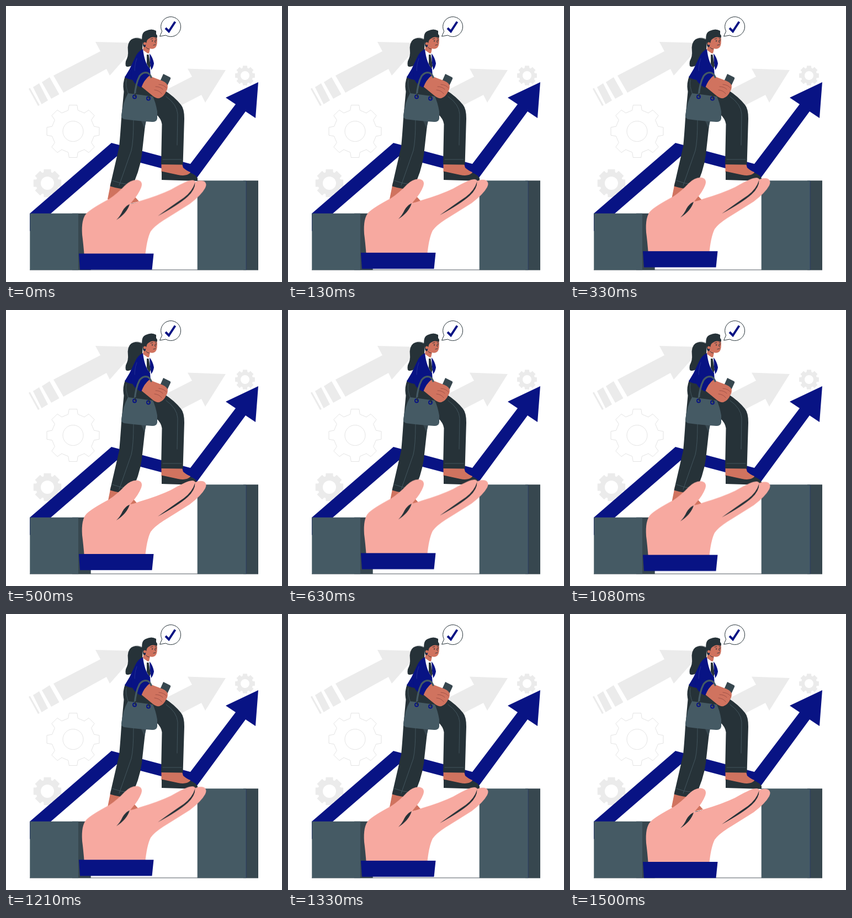
Recreate the animation shown at these times as an HTML page. Size 500 by 500 pixels, loop 1540 ms.

```html
<!DOCTYPE html>
<html lang="en">
<head>
<meta charset="utf-8">
<title>Step up</title>
<style>
  html, body { margin: 0; width: 100%; height: 100%; overflow: hidden; background: #fff; }
  svg { display: block; width: 100%; height: 100%; }
  .pale { fill: #ebebeb; }
  .navy { fill: #081384; }
  .ink { fill: #263238; }
  .slate { fill: #455a64; }
  .deep { fill: #37474f; }
  .skin { fill: #d0735f; }
  .palm { fill: #f7a9a0; }
  .line { fill: none; stroke-linecap: round; stroke-linejoin: round; }
</style>
</head>
<body>
<svg viewBox="0 0 500 500">
  <g class="pale">
    <path d="M86 126L171 82L162 65L240 67L188 126L182 114L104 157Z"/>
    <path d="M65 138L79 129L96.500 160L82 168Z"/>
    <path d="M49 147L60 140L76 171L64.500 178Z"/>
    <path d="M41 150L43.500 148.500L61 179.500L58 181Z"/>
    <path d="M270 162L337 128L329 113.500L398 116L361 175L354 161L290 194Z"/>
  </g>
  <g id="gears"></g>

  <path class="navy" d="M43 376L191 248L334 286L416 178L398 166L457 138L452 203L434 191L346 311L200.500 272.500L81 376L43 408Z"/>

  <g id="blocks">
    <path d="M43 478H457" stroke="#263238" stroke-width=".8"/>
    <path class="deep" d="M120 375.700H153.700V478.200H120Z"/>
    <path class="slate" d="M43.300 375.700H131V478.200H43.300Z"/>
    <path class="deep" d="M430 316.200H457V478.200H430Z"/>
    <path class="slate" d="M346.700 316.200H435V478.200H346.700Z"/>
    <path d="M435 317V478" stroke="#081384" stroke-width=".6" opacity=".5"/>
  </g>

  <g id="bubble">
    <path d="M278.600 55L282.600 45.800A18 18 0 1 1 289.400 53Z" fill="#fff" stroke="#263238" stroke-width="1" stroke-linejoin="round"/>
    <path d="M289 40L295 46L306.500 28.500" fill="none" stroke="#081384" stroke-width="4"/>
  </g>

  <g id="woman">
    <!-- back leg and foot -->
    <path class="skin" d="M190 320L184 350L206 362L241 354L216 326Z"/>
    <path class="ink" d="M225 358L232 357L242 354.500L238 361Z"/>
    <path class="ink" d="M214 150L209 203Q207 235 205 255L188.500 326.500Q206 332 226 332Q242 300 246 270L253 207L250 160Z"/>
    <!-- front leg and shoe -->
    <path class="skin" d="M281.500 285L319 286L321 293Q328 299 334 301L333 307L300 307L281.500 301Z"/>
    <path class="ink" d="M282 299.500Q298 303 312 306Q327 309 334 302Q344 306 347 312L347 317L282 315Z"/>
    <path class="ink" d="M216 127Q211 140 213 152L218 168L272 196Q281 204 282.500 214L281 287L320.500 287.500L323 204Q323 186 317 179Q305 164 286 152L262 126Z"/>
    <g class="line" stroke="#4a5d66" stroke-width=".8">
      <path d="M231 207Q231 245 227 262L205 325"/>
      <path d="M192 316Q207 322 222 323"/>
      <path d="M290 164Q310 178 311 196L310 252"/>
      <path d="M284 278H318"/>
      <path d="M218 134Q216 146 222 160"/>
    </g>

    <!-- head -->
    <path class="ink" d="M248 60Q236 54.500 227 60.500Q219 67 221 82Q222 90 217 100Q215 110 220 110Q229 111 234 99Q238 90 247 80Z"/>
    <path class="line" d="M224 62Q234 54 246 60" stroke="#fff" stroke-width=".7"/>
    <path class="skin" d="M250 60L248 82L258 91L261 77Q267 79 271 75Q275 70 273.500 56L258 53Z"/>
    <path class="ink" d="M246.500 62Q245 48 253.500 45Q264 40 272 45L272 51Q275.500 54 273 58Q265 54 259 59Q255 61 254.500 66L252 75L248.500 73Z"/>
    <circle class="skin" cx="251.500" cy="68" r="2.600"/>
    <circle class="navy" cx="252" cy="72" r=".9"/>
    <g class="line" stroke="#263238" stroke-width=".9">
      <path d="M262 60L266 59M270 59L273 60M267 71L271 70M269 63L271 67"/>
      <path d="M265 62.500V64M271.500 62V63.500" stroke-width="1.400"/>
      <path d="M254 75Q256 78 259 78"/>
    </g>

    <!-- jacket, shirt and tie -->
    <path d="M247 79L257 86L263 84L264 116H252Z" fill="#fff"/>
    <path class="ink" d="M255 88L258.500 88L262 108L260 114L255 105Z"/>
    <path class="navy" d="M248 78Q238 83 234 93L224 114L215 129Q224 135 238 134L262 128L261 114Q251 104 248 78Z"/>
    <path class="navy" d="M260 86Q266 93 268 104Q267 111 263 116L261 103Z"/>
    <path class="line" d="M237 95Q231 111 234 126" stroke="#2f3a98" stroke-width=".7"/>

    <!-- phone, arm and hand -->
    <path class="deep" d="M285 123L297 129Q299 130 298 132L291 147L277 141Z"/>
    <path class="skin" d="M256 125Q268 130 279 134Q289 137 292.500 143Q294 149 290 155Q286 164 278 167Q272 168 266 163L244 145Z"/>
    <path class="line" d="M271 146Q279 146 284 151M277 142Q287 143 291 149M269 152Q278 153 282 159" stroke="#8e463f" stroke-width=".7"/>
    <path class="navy" d="M228 118Q226 130 231 137Q236 144 245 148Q250 134 260 126L244 116Z"/>

    <!-- bag -->
    <path class="deep" d="M244 206L254 208L251 222Z"/>
    <path class="slate" d="M221 158Q244 161 266 164Q271 174 274 191L274 204Q273 210 265 210Q236 208 214 205Q208 203 209 198Q212 174 221 158Z"/>
    <path class="line" d="M233 163Q235 140 242 127Q248 119 256 121Q261 123 263 129" stroke="#455a64" stroke-width="3.200"/>
    <g fill="#455a64" stroke="#081384" stroke-width="1.800">
      <circle cx="233" cy="164.500" r="3"/>
      <circle cx="258" cy="167.500" r="3"/>
    </g>
    <path class="line" d="M234 159V164M259 162V167" stroke="#263238" stroke-width="2"/>
  </g>

  <g id="hand">
    <path class="palm" d="M142 455Q140 430 138 415Q136 386 146 376Q155 367 187 350Q202 340 215 326Q226 315 237 315.500Q249 317 245 329Q240 342 229 354L225 359Q232 358 242 354Q276 344 299 333Q325 318 334 316.500Q341 315 343 319Q352 315 359 318Q365 322 361 330Q354 343 333 359Q306 376 285 389Q268 400 262 409Q255 423 252 455Z"/>
    <path class="ink" d="M224 359.500Q219 376 200 388Q207 381 211 372Q216 363 224 359.500Z"/>
    <path class="ink" d="M342.500 320Q343 333 329 346Q312 361 275 381Q304 360 322 348Q338 336 342.500 320Z"/>
    <path class="navy" d="M132 449H267.500L264.500 478.200H134Z"/>
  </g>
</svg>
<script>
  // Eight-toothed gear with a round hole; w is half the angle of a tooth tip.
  function gear(cx, cy, root, tip, hole, w, attrs) {
    const pts = [];
    const add = (r, a) => pts.push((cx + r * Math.cos(a)).toFixed(2) + " " + (cy + r * Math.sin(a)).toFixed(2));
    for (let i = 0; i < 8; i++) {
      const a = i * Math.PI / 4;
      add(root, a - w - .08);
      add(tip, a - w);
      add(tip, a + w);
      add(root, a + w + .08);
    }
    const ring = `M${cx - hole} ${cy}a${hole} ${hole} 0 1 0 ${2 * hole} 0a${hole} ${hole} 0 1 0 ${-2 * hole} 0Z`;
    return `<path fill-rule="evenodd" d="M${pts.join("L")}Z${ring}" ${attrs}/>`;
  }

  const solid = 'fill="#ebebeb"';
  document.getElementById("gears").innerHTML =
    gear(433, 126, 14.5, 18.3, 8, .22, solid) +
    gear(75, 321, 21, 26, 12, .25, solid) +
    gear(121.5, 227, 39, 48, 18.5, .15, 'fill="none" stroke="#e0e0e0" stroke-width=".9"');

  // The hand floats up 10px and back, 37 poses per loop.
  const poses = 37;
  document.getElementById("hand").animate(
    [0, -10, 0].map(y => ({ transform: `translate(0px, ${y}px)` })),
    { duration: 1540, iterations: Infinity, iterationStart: 1.1 / poses, easing: `steps(${poses})` }
  );
</script>
</body>
</html>
```
